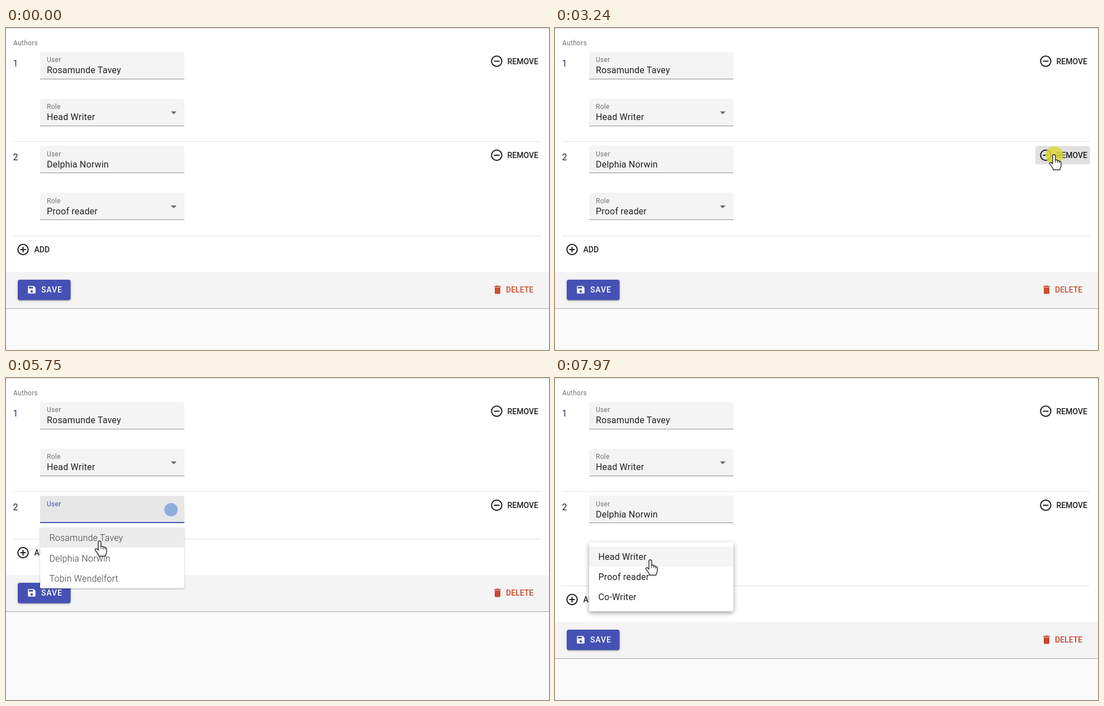
An HTML page that plays this animation: 971x577 px, repeating every 8000 ms.

```html
<!DOCTYPE html>
<html lang="en">
<head>
<meta charset="utf-8">
<title>Author list form</title>
<style>
  html, body { margin: 0; width: 100%; height: 100%; overflow: hidden; background: #fafafa; }
  svg { display: block; width: 100vw; height: 100vh; }
  text { font: 400 16px Roboto, sans-serif; letter-spacing: .2px; fill: #212121; white-space: pre; }
  .small { font-size: 12px; letter-spacing: .3px; fill: #707070; }
  .light { font-weight: 300; fill: #3c3c3c; }
  .button { font-weight: 500; font-size: 14px; letter-spacing: 0; }
  .raised { filter: drop-shadow(0 1.5px .7px rgba(0,0,0,.25)) drop-shadow(0 1px 2px rgba(0,0,0,.2)); }
  .panel { filter: drop-shadow(0 1px 1px rgba(0,0,0,.32)); }
  .menu { filter: drop-shadow(0 3px 4px rgba(0,0,0,.38)); }
</style>
</head>
<body>
<svg id="stage" viewBox="0 0 971 577"></svg>
<script>
const LOOP = 8000;
const INDIGO = [69, 81, 180], GREY = [216, 216, 216];
const USERS = ['Rosamunde Tavey', 'Delphia Norwin', 'Tobin Wendelfort'];
const ROLES = ['Head Writer', 'Proof reader', 'Co-Writer'];

// Moments at which the form changes
const REMOVED = 3260, ADDED = 4310, FOCUSED = 4980, LISTED = 5030, PICKED = 7110, MENU = 7850;
const PRESSES = [3140, 4110, 4930, 6960, 7770];

// Pointer path: time, x, y
const PATH = [
  [1150, 735, 542], [1300, 600, 480], [1450, 350, 390], [1600, 165, 335], [1760, 110, 337],
  [2070, 110, 337], [2120, 200, 332], [2170, 290, 286], [2220, 418, 282], [2270, 505, 272],
  [2320, 597, 270], [2370, 671, 261], [2500, 785, 245], [2650, 858, 236], [2840, 890, 230],
  [2940, 893, 228], [3300, 893, 228], [3400, 800, 243], [3550, 370, 240], [3700, 75, 229],
  [3790, 26, 227], [4380, 26, 227], [4460, 22, 225], [4540, 40, 228], [4700, 120, 237],
  [4880, 160, 239], [5330, 160, 239], [5500, 162, 258], [5650, 167, 285], [5750, 168, 293],
  [5900, 170, 304], [6100, 175.5, 322], [7400, 175.5, 322], [7720, 171, 327], [8000, 171, 327]
];

const ICONS = {
  save: 'M17 3H5c-1.1 0-2 .9-2 2v14c0 1.1.9 2 2 2h14c1.1 0 2-.9 2-2V7l-4-4zm-5 16c-1.7 0-3-1.3-3-3s1.3-3 3-3 3 1.3 3 3-1.3 3-3 3zm3-10H5V5h10v4z',
  trash: 'M6 19c0 1.1.9 2 2 2h8c1.1 0 2-.9 2-2V7H6v12zM19 4h-3.5l-1-1h-5l-1 1H5v2h14V4z'
};
const POINTERS = {
  arrow: '<path d="M0 0V22L5 17.5 8.2 24.3 11.8 22.8 8.8 16.1H15.5Z" fill="#fff" stroke="#26262e" stroke-width="1.2"/>',
  hand: `<g fill="#fff" stroke="#26262e" stroke-width="1.4" stroke-linejoin="round" transform="translate(-.5 -.8)">
    <path d="M-2.5 2A2.4 2.4 0 0 1 2.3 2V10C3 8.4 6 8.8 6.3 11 7.5 9.8 9.4 10.4 9.6 12.2 11 11.4 12.5 12.4 12.5 14V19C12.5 23 10.5 24 10.2 27H-1.3C-2 23.5-5 20.5-7.8 16.5-9.3 14-6.5 12.6-4.6 14.4L-2.5 16.4Z"/>
    <path d="M2.3 10V14M6.3 11V14.5M9.6 12.2V15" fill="none" stroke-width="1.1"/></g>`,
  beam: '<path d="M-4-10H-1L0-9 1-10H4M0-9V9M-4 10H-1L0 9 1 10H4" fill="none" stroke="#222" stroke-width="1.3"/>'
};

const clamp = u => Math.max(0, Math.min(1, u));
const ramp = (t, start, length) => clamp((t - start) / length);
const easeOut = u => 1 - (1 - u) ** 2;
const lerp = (a, b, u) => a + (b - a) * u;
const mix = (a, b, u) => `rgb(${a.map((v, i) => Math.round(lerp(v, b[i], u)))})`;

const rect = (x, y, w, h, fill, more = '') =>
  `<rect x="${x}" y="${y}" width="${w}" height="${h}" fill="${fill}" ${more}/>`;
const text = (x, y, content, cls = '', style = '') =>
  `<text x="${x}" y="${y}" class="${cls}" style="${style}">${content}</text>`;
const icon = (name, x, y, size, fill) =>
  `<path d="${ICONS[name]}" fill="${fill}" transform="translate(${x} ${y}) scale(${size / 24})"/>`;
const ringIcon = (x, y, sign) =>
  `<g fill="none" stroke="#1d1d1d" stroke-width="2"><circle cx="${x}" cy="${y}" r="9.2"/><path d="M${x - 5} ${y}h10${sign === '+' ? 'm-5-5v10' : ''}"/></g>`;

function pointerAt(t) {
  if (t < PATH[0][0]) return null;
  const i = PATH.findIndex(p => p[0] > t);
  const [a, b] = [PATH[i - 1], PATH[i]];
  const u = (t - a[0]) / (b[0] - a[0]);
  return { x: lerp(a[1], b[1], u), y: lerp(a[2], b[2], u) };
}

// Text may sit on half pixels; the box edges stay on whole ones
function field(y, label, value, { hover, focus, arrow, float = 1 } = {}) {
  const top = Math.floor(y);
  const bg = focus ? '#e7e7e7' : hover ? '#ececec' : '#f4f4f4';
  const line = focus ? '#4551b4' : hover ? '#222' : '#8e8e8e';
  const labelStyle = `font-size:${lerp(16, 12, float)}px;fill:${focus ? '#4551b4' : '#707070'}`;
  return `<path d="M61 ${top + 49}V${top + 4}q0-4 4-4H315q4 0 4 4V${top + 49}Z" fill="${bg}"/>`
    + (focus ? rect(61, top + 47, 258, 2, line) : rect(61, top + 48, 258, 1, line))
    + text(73, y + lerp(30, 18, float), label, 'small', labelStyle)
    + text(73, y + 38.2, value)
    + (arrow ? `<path d="M295 ${y + 22.5}h10l-5 5Z" fill="#666"/>` : '');
}

const removeButton = (y, shade) =>
  rect(859, y + 43, 98, 33, '#000', `rx="4" opacity="${shade}"`)
  + ringIcon(877.5, y + 59.5, '-') + text(896.5, y + 64.5, 'REMOVE', 'button');

function list(items, top, active, activeFill, cls) {
  return items.map((item, i) => {
    const y = top + i * 36.3;
    return (i === active ? rect(61, Math.round(y), 258, 36, activeFill) : '') + text(77.5, y + 24, item, cls);
  }).join('');
}

function opening(t, start, end, top, content) {
  const u = easeOut(ramp(t, start, 120));
  const alpha = Math.min(u, 1 - ramp(t, end, 60));
  return alpha <= 0 ? ''
    : `<g opacity="${alpha}" transform="translate(0 ${top}) scale(1 ${lerp(.8, 1, u)}) translate(0 ${-top})">${content}</g>`;
}

function draw(t) {
  const pointer = pointerAt(t);
  const over = (x, y, w, h) => !!pointer && pointer.x >= x && pointer.x <= x + w && pointer.y >= y && pointer.y <= y + h;
  const hasSecond = t < REMOVED || t >= ADDED;
  const hasRole = t < REMOVED || t >= PICKED;
  const end = !hasSecond ? 203 : hasRole ? 372 : 288;
  const footer = end + 65;
  const focus = t >= FOCUSED && t < PICKED;
  const listOpen = t >= LISTED && t < PICKED;
  const overUser = hasSecond && over(61, 211, 258, 49);
  const overRole = hasRole && over(61, 296, 258, 49);
  const overRemove = t < REMOVED + 60 && over(859, 212, 98, 33);
  const optionIndex = listOpen && over(61, 268, 258, 109) ? Math.floor((pointer.y - 268) / 36.3) : -1;

  let out = rect(0, 0, 971, footer + 65, '#fff') + rect(0, 0, 971, 1, '#cfcfcf')
    + text(13, 30.5, 'Authors', 'small')
    + text(12.5, 69, '1', '', 'fill:#26355f')
    + field(43, 'User', USERS[0]) + field(127, 'Role', ROLES[0], { arrow: true })
    + removeButton(0, 0) + rect(13, 203, 944, 1, '#e0e0e0');

  if (hasSecond) {
    const picked = t < REMOVED || t >= PICKED;
    out += text(12.5, 237, '2')
      + field(211.5, 'User', picked ? USERS[1] : '',
        { hover: overUser, focus, float: picked ? 1 : ramp(t, FOCUSED, 150) })
      + removeButton(168.5, t < REMOVED ? .04 * ramp(t, 2640, 200) + .08 * ramp(t, 3140, 100) : 0)
      + rect(13, end, 944, 1, '#e0e0e0');
    if (hasRole) out += field(295.5, 'Role', t < REMOVED ? ROLES[1] : '',
      { hover: overRole, arrow: true, float: t < REMOVED ? 1 : 0 });
  }
  if (focus && Math.floor((t - 5050) / 500) % 2 === 0) out += rect(73, 234, 1, 20, '#222');
  if (t >= 5100 && t < 5850) out += '<circle cx="295" cy="236" r="12" fill="#8eaee0"/>';

  // Add button, with its hover shade lingering after the row is inserted
  const addShade = (.04 * ramp(t, 3790, 150) + .06 * ramp(t, 4110, 100) * (1 - ramp(t, 4210, 150)))
    * (1 - ramp(t, 4360, 200));
  out += rect(13, end + 9, 70, 32, '#000', `rx="4" opacity="${addShade}"`)
    + ringIcon(30.5, end + 25, '+') + text(50.5, end + 30, 'ADD', 'button');

  const disabled = t >= REMOVED && t < ADDED;
  const enabled = t < ADDED ? 1 - easeOut(ramp(t, REMOVED, 400)) : easeOut(ramp(t, ADDED, 400));
  const saveInk = disabled ? '#a4a4a4' : '#fff';
  const red = t < REMOVED ? '#c8512f' : '#c8452f';
  out += rect(0, footer, 971, 65, '#f4f4f4') + rect(0, footer + 65, 971, 1, '#b0b0b0')
    + rect(0, footer + 66, 971, 1, '#e6e6e6')
    + rect(21, footer + 14, 94.5, 36.5, mix(GREY, INDIGO, enabled), `rx="4" class="${enabled > .5 ? 'raised' : ''}"`)
    + icon('save', 37, footer + 23, 18, saveInk)
    + text(63, footer + 37, 'SAVE', 'button', `fill:${saveInk};letter-spacing:.9px`)
    + icon('trash', 869, footer + 22, 20, red)
    + text(894, footer + 37, 'DELETE', 'button', `fill:${red}`);

  if (t >= LISTED) out += opening(t, LISTED, PICKED, 268,
    rect(61, 268, 258, 109, '#fff', 'rx="2" class="panel"')
    + list(USERS, 268.3, optionIndex, t >= 6960 ? '#aeaeae' : '#ececec', 'light'));
  if (t >= MENU) out += opening(t, MENU, LOOP, 294,
    rect(61, 294, 258, 124, '#fff', 'rx="4" class="menu"')
    + list(ROLES, 301.6, 0, '#f4f4f4', ''));

  if (pointer) {
    if (PRESSES.some(p => t >= p && t < p + 130))
      out += `<circle cx="${pointer.x}" cy="${pointer.y}" r="16" fill="#dcd73a" opacity=".85"/>`;
    const onAdd = t > 3740 && t < 4560;
    const shape = onAdd || overRemove || overRole || optionIndex >= 0 || t >= PICKED ? 'hand'
      : overUser ? 'beam' : 'arrow';
    out += `<g transform="translate(${pointer.x} ${pointer.y})">${POINTERS[shape]}</g>`;
  }
  return out;
}

const stage = document.getElementById('stage');
const startTime = performance.now();
function tick() {
  stage.innerHTML = draw((performance.now() - startTime) % LOOP);
  requestAnimationFrame(tick);
}
tick();
</script>
</body>
</html>
```
